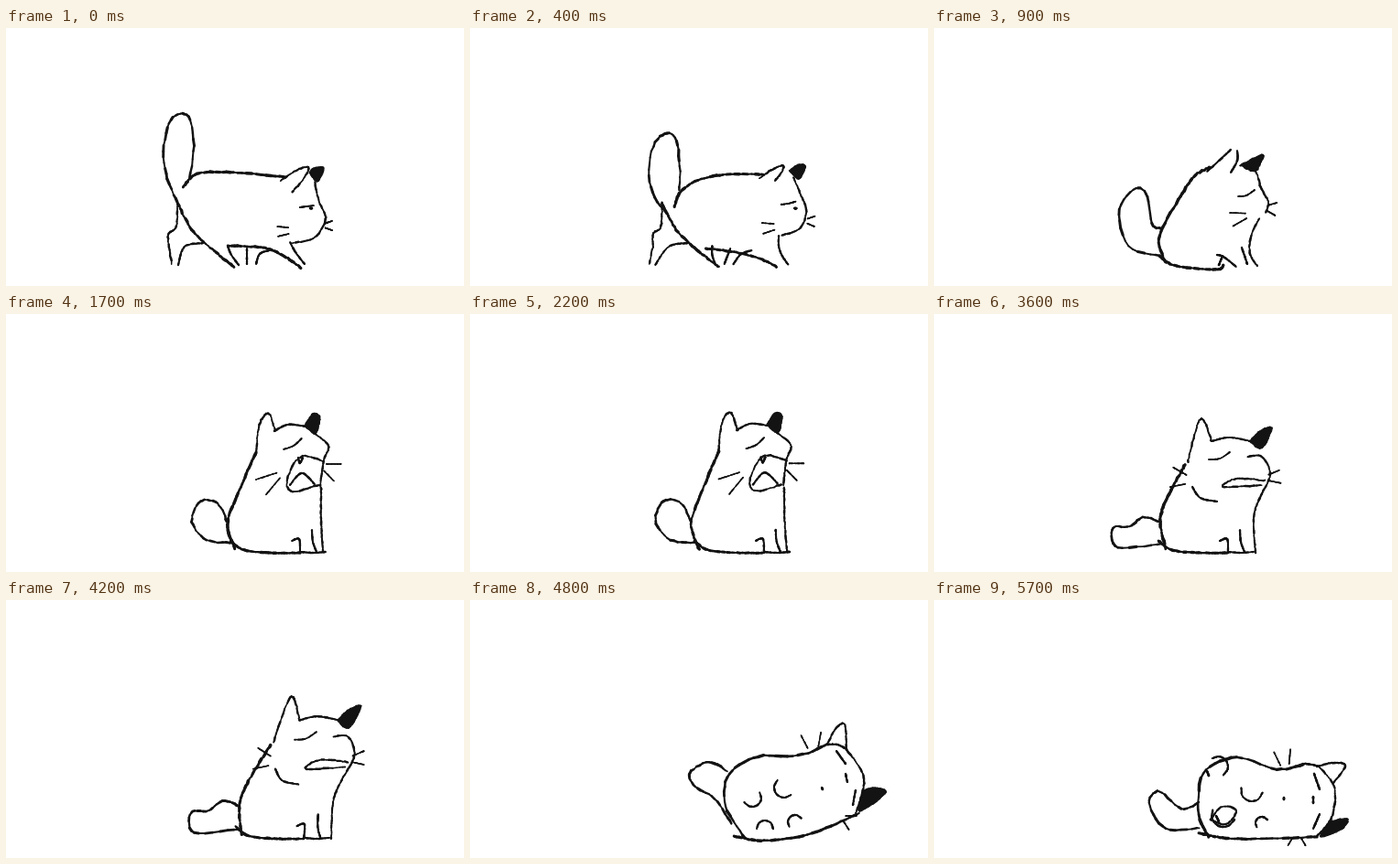
An HTML page with a canvas that plays this animation: 500x282 px, repeating every 5800 ms.

```html
<!DOCTYPE html>
<html lang="en">
<head>
<meta charset="utf-8">
<title>Sleepy cat</title>
<style>
html, body { margin: 0; width: 100%; height: 100%; overflow: hidden; background: #fff; }
canvas { display: block; }
</style>
</head>
<body>
<canvas id="stage" width="500" height="282"></canvas>
<script>
const ctx = document.getElementById('stage').getContext('2d');
const LOOP = 5800, STEP = 100, SAMPLES = 36, GROUND = 262, INK = '#131313';
const WIDTHS = { back: 3, belly: 2.8, rump: 2.7, tail: 2.6, dark: 1.2, eye: 1.7 };

const lerp = (a, b, f) => a + (b - a) * f;
const noise = n => { const s = Math.sin(n * 12.9898) * 43758.5453; return s - Math.floor(s); };
const polar = (x, y, r, angle) => [x + r * Math.cos(angle), y + r * Math.sin(angle)];
const parse = text => text.split(' ').map(p => p.split(',').map(Number));

// Evenly sampled Catmull-Rom curve through a few key points
function curve(p) {
  const at = i => p[Math.max(0, Math.min(p.length - 1, i))];
  return Array.from({ length: SAMPLES }, (_, s) => {
    const u = s / (SAMPLES - 1) * (p.length - 1), i = Math.min(Math.floor(u), p.length - 2), f = u - i;
    return [0, 1].map(k => {
      const [a, b, c, d] = [-1, 0, 1, 2].map(o => at(i + o)[k]);
      return b + f / 2 * (c - a + f * (2 * a - 5 * b + 4 * c - d + f * (3 * (b - c) + d - a)));
    });
  });
}

// Whiskers are pairs fanning out from a point: x, y, angle, spread, inner and outer radius.
// Paws are open arcs: x, y, radius, facing angle.
function makePose(lines, whiskers, paws = []) {
  const pose = {};
  for (const [name, text] of Object.entries(lines)) {
    const p = parse(text);
    pose[name] = curve(name === 'dark' ? [...p, p[0]] : p);
  }
  whiskers.forEach(([x, y, angle, spread, r0, r1], n) => [-1, 1].forEach(side => {
    pose['whisker' + n + side] = curve([r0, r1].map(r => polar(x, y, r, angle + side * spread)));
  }));
  paws.forEach(([x, y, r, facing], n) => {
    pose['arc' + n] = curve([-1.6, -.8, 0, .8, 1.6].map(a => polar(x, y, r, facing + a)));
  });
  return pose;
}

const walk = makePose({
  tail: '201,163 205,128 201,100 190,94 178,104 172,135 176,165 187,190',
  back: '193,174 210,159 250,158 305,163',
  rump: '187,191 204,222 230,246 249,261',
  leg1: '187,190 186,217 177,227 181,258',
  leg2: '215,235 195,239 188,259',
  leg3: '242,238 246,248 254,259',
  leg4: '263,241 263,258',
  leg5: '287,243 277,247 273,258',
  belly: '242,238 280,240 303,249 322,262',
  chest: '310,234 316,245 326,258',
  ear: '300,167 316,156 330,152 326,163 313,179',
  dark: '331,158 336,153 347,153 340,168',
  face: '337,168 342,190 349,208 337,229 312,235',
  eye: '321,196 336,194',
  pupil: '332,197 334,197'
}, [[330, 220, 3.07, .16, 22, 34], [342, 216, 0, .35, 7, 15]]);

const sit = makePose({
  tail: '247,219 238,214 232,182 219,176 202,200 213,239 246,249',
  back: '253,257 246,228 268,186 284,162 302,152',
  belly: '246,249 264,260 308,264 316,259',
  paw: '309,248 316,250 330,261',
  toe: '315,249 311,259',
  shin: '336,240 342,258',
  chest: '355,208 346,228 345,247 353,260',
  ear: '298,157 310,146 324,133',
  earIn: '331,134 331,145 324,158',
  dark: '334,150 358,138 357,147 350,157',
  face: '336,150 351,157 357,175 365,190 362,202',
  eye: '332,184 341,183 350,177'
}, [[350, 203, 2.9, .28, 10, 27], [357, 196, .12, .4, 8, 18]]);

const seat = {
  belly: '245,248 260,258 290,261 321,261',
  paw: '312,248 320,246 321,260',
  sole: '321,260 335,261 349,260',
  shin: '334,236 335,249 339,260'
};

const yawn = makePose({
  ...seat,
  tail: '241,226 231,207 212,205 203,227 219,247 247,250',
  back: '250,257 242,228 257,188 273,151',
  chest: '344,190 344,225 346,259',
  ear: '273,151 277,120 287,109 294,128',
  crown: '293,128 308,121 327,123',
  dark: '326,122 335,109 343,113 338,131',
  face: '336,130 352,144 347,160 343,188',
  mouth: '347,161 322,156 307,181 313,194 341,187',
  tongue: '310,187 323,174 337,186',
  tooth: '319,157 321,163 324,157',
  eye: '303,148 314,144 323,136'
}, [[307, 170, 2.55, .28, 12, 36], [340, 164, .4, .4, 10, 26]]);

const wide = makePose({
  ...seat,
  tail: '240,227 221,214 204,216 200,239 220,254 247,253',
  back: '248,256 241,232 249,203 267,168',
  chest: '347,185 347,215 350,259',
  ear: '269,168 261,127 270,124 286,136',
  crown: '286,136 304,126 327,123',
  dark: '326,122 336,114 342,122 342,138',
  face: '351,141 356,157 346,185',
  mouth: '353,163 314,160 297,180 312,187 346,185',
  tongue: '303,184 318,172 333,181',
  tooth: '313,160 315,166 318,160',
  eye: '297,151 307,144 319,139'
}, [[290, 175, 3.15, .43, 13, 30], [347, 168, .45, .4, 7, 23]]);

const close = makePose({
  ...seat,
  tail: '246,227 228,222 214,232 195,234 201,255 248,251',
  back: '253,257 247,225 257,196 274,165',
  chest: '357,198 349,222 351,261',
  ear: '277,162 288,120 295,117 303,139',
  crown: '303,139 322,135 346,139',
  dark: '344,139 357,127 369,125 358,147',
  face: '342,156 358,156 367,175 357,198',
  mouth: '361,182 330,180 316,189 358,187',
  cheek: '282,189 291,201 309,205',
  eye: '300,159 312,158 323,151'
}, [[288, 183, 3.3, .36, 14, 31], [355, 180, -.1, .3, 11, 24]]);

const flop = makePose({
  tail: '281,187 261,177 240,189 246,204 267,217 285,244',
  back: '300,260 279,225 283,190 315,171 358,170 390,158',
  belly: '288,258 320,263 370,256 425,233',
  ear: '390,158 399,141 409,136 411,164',
  crown: '390,158 401,158 411,163',
  face: '411,163 430,195 421,234',
  dark: '429,208 442,205 454,211 425,231',
  mark: '400,165 410,179',
  lid1: '410,190 412,199',
  lid2: '421,208 418,224',
  nose: '384,205 385,207'
}, [[377, 178, -1.72, .33, 18, 34], [404, 236, .5, .5, 6, 18]],
[[308, 216, 10, 1], [343, 205, 11, 2.4], [322, 250, 9, -1.57], [355, 243, 8, -2.2]]);

const sleep = makePose({
  tail: '289,221 270,228 246,209 235,222 253,250 290,249',
  back: '300,259 289,235 294,190 330,172 374,185 405,179',
  belly: '289,255 330,261 418,259',
  ear: '418,182 435,178 449,181 436,200',
  crown: '405,179 413,180 420,182',
  face: '420,182 437,205 434,238 418,258',
  dark: '431,242 451,239 446,250 422,259',
  mark: '415,190 421,207',
  lid1: '414,215 414,222',
  lid2: '421,234 414,250',
  nose: '382,216 382,218',
  pad: '302,240 314,226 330,230 319,245 302,240',
  toe1: '298,187 300,192',
  toe2: '308,236 311,242'
}, [[386, 197, -1.75, .27, 18, 34], [396, 252, 1.57, .53, 9, 19]],
[[310, 182, 11, -.6], [347, 208, 12, 1.8], [316, 235, 13, 2], [358, 244, 7, -2.2]]);

// time, pose, shift, lean, stretch
const keys = [
  [0, walk], [300, walk, 18], [600, sit, 4, 10], [900, sit], [1200, sit, 0, -4, 8],
  [1600, yawn], [2300, yawn, 0, -2, 1], [2800, wide], [3000, wide], [3500, close], [3700, close],
  [4200, close, 4, 14, 8], [4400, close, 14, 24, 14], [4800, flop], [5400, sleep, -6], [5700, sleep], [LOOP, sleep]
];

// Leaning and stretching grow with height, so the feet stay put
function place([, pose, shift = 0, lean = 0, stretch = 0]) {
  const bend = ([x, y]) => {
    const h = (GROUND - y) / 130;
    return [x + shift + lean * h, y - stretch * h];
  };
  return Object.fromEntries(Object.entries(pose).map(([name, pts]) => [name, pts.map(bend)]));
}

function center(shape) {
  const pts = [...shape.back, ...shape.face];
  return [0, 1].map(k => pts.reduce((sum, p) => sum + p[k], 0) / pts.length);
}

// Shared strokes morph; the others ride along and swap halfway
function poseAt(t) {
  const i = keys.findIndex((k, n) => t < keys[n + 1][0]);
  const u = (t - keys[i][0]) / (keys[i + 1][0] - keys[i][0]), f = u * u * (3 - 2 * u);
  const a = place(keys[i]), b = place(keys[i + 1]), ca = center(a), cb = center(b), out = {};
  for (const name of new Set([...Object.keys(a), ...Object.keys(b)])) {
    const from = a[name], to = b[name];
    if (from && to) out[name] = from.map((p, n) => p.map((v, k) => lerp(v, to[n][k], f)));
    else if (from && f < .5) out[name] = from.map(p => p.map((v, k) => v + (cb[k] - ca[k]) * f));
    else if (to && f >= .5) out[name] = to.map(p => p.map((v, k) => v - (cb[k] - ca[k]) * (1 - f)));
    if (/^leg/.test(name) && out[name]) {
      const swing = Math.sin(t / 300 * Math.PI) * 9;
      out[name] = out[name].map(([x, y]) => [x + swing * Math.max(0, y - 238) / 20, y]);
    }
  }
  return out;
}

function drawStroke(name, pts, seed) {
  const gap = Math.hypot(pts[1][0] - pts[0][0], pts[1][1] - pts[0][1]);
  const amp = Math.min(1, gap * .5);
  const rough = pts.map((p, n) => p.map((v, k) => v + (noise(seed + n * 2.3 + k * 71) - .5) * amp));
  if (name === 'dark') {
    ctx.beginPath();
    rough.forEach(p => ctx.lineTo(...p));
    ctx.fill();
  }
  const width = WIDTHS[name] || (/^whisker/.test(name) ? 1.5 : 2.1);
  for (let n = 1; n < rough.length; n++) {
    ctx.lineWidth = width * (.65 + .6 * noise(seed + n * 5.7));
    ctx.beginPath();
    ctx.moveTo(...rough[n - 1]);
    ctx.lineTo(...rough[n]);
    ctx.stroke();
  }
}

function draw(now) {
  const tick = Math.floor(now % LOOP / STEP);
  ctx.fillStyle = '#fff';
  ctx.fillRect(0, 0, 500, 282);
  ctx.fillStyle = ctx.strokeStyle = INK;
  ctx.lineCap = ctx.lineJoin = 'round';
  Object.entries(poseAt(tick * STEP)).forEach(([name, pts], n) => drawStroke(name, pts, tick * 13 + n * 101));
}

const start = performance.now();
function frame() {
  draw(performance.now() - start);
  requestAnimationFrame(frame);
}
frame();
</script>
</body>
</html>
```
